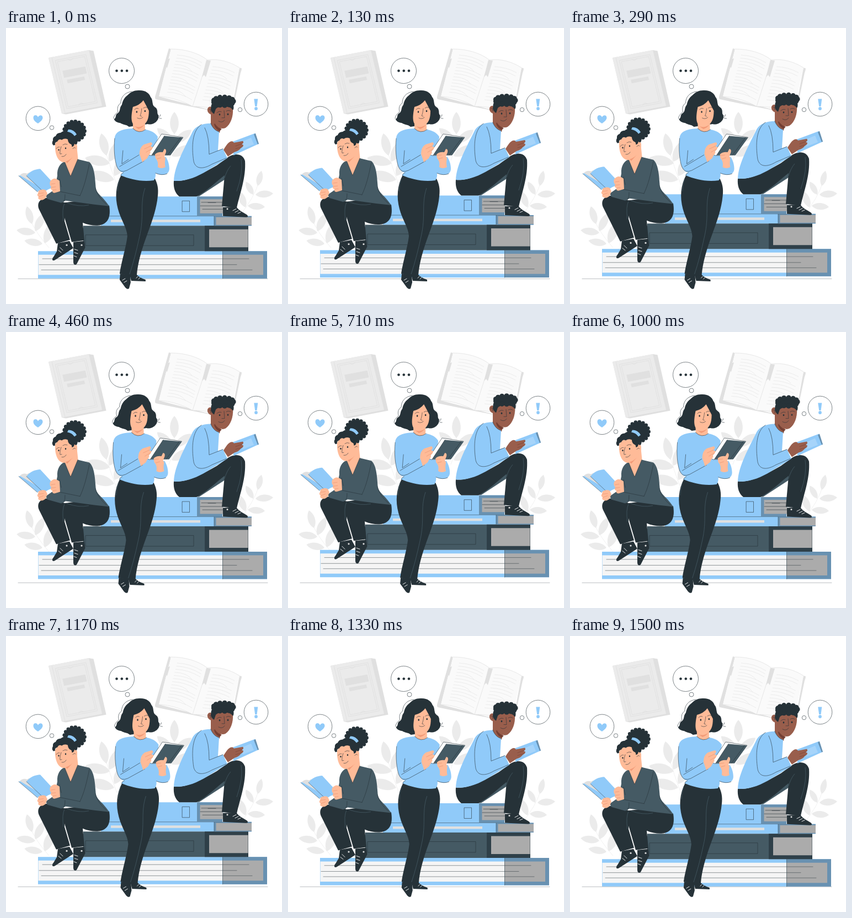
Recreate the animation shown at these times as an HTML page. Size 500x500 px, loop 1540 ms.

```html
<!DOCTYPE html>
<html lang="en">
<head>
<meta charset="utf-8">
<title>Reading together</title>
<style>
html, body { margin: 0; height: 100%; overflow: hidden; background: #fff; }
svg { display: block; width: 100vw; height: 100vh; }
.blue { fill: #90caf9; }
.shade { fill: #6891b1; }
.ink { fill: #263238; }
.slate { fill: #455a64; }
.skin { fill: #ffbb98; }
.brown { fill: #995e4c; }
.page { fill: #ababab; }
.pale { fill: #ebebeb; }
.grey { fill: #e0e0e0; }
.line { fill: none; stroke: #263238; stroke-width: .6; stroke-linecap: round; stroke-linejoin: round; }
.soft { fill: none; stroke: #dedede; stroke-width: .7; }
.seam { fill: none; stroke: #56707c; stroke-width: .5; }
.lace { fill: none; stroke: #fff; stroke-width: .9; stroke-linecap: round; }
.bubble { fill: #fff; stroke: #263238; stroke-width: .6; }
</style>
</head>
<body>
<svg viewBox="0 0 500 500">
  <!-- closed book in the background -->
  <g transform="matrix(.986 -.189 .231 .971 77 54)">
    <path class="grey" d="M0 0L74 0L82 3L81 107L7 107L0 104Z"/>
    <path class="pale" d="M0 0H74V104H0Z"/>
    <path class="soft" d="M6 0V104M7 105H80M77 2V106M11 7H67V97H11ZM14 10H64V94H14Z"/>
    <path class="soft" d="M33 9q5 6 10 0M33 95q5-6 10 0"/>
    <path class="grey" d="M19 28h42v13H19ZM23 45.500h32v6.500H23Z"/>
  </g>

  <!-- open book in the background -->
  <path class="grey" d="M295 37L299 38L277 124L338 140L407 158L423 72L427 73Q427 76 425 81L409 157L338 143L271 129Q269 126 271 121Z"/>
  <path d="M299 38C322 38 347 44 365 58C385 55 406 61 423 72L404 155C382 146 360 142 338 142C318 131 295 125 277 124Z" fill="#fafafa"/>
  <path class="soft" d="M365 58L338 142M277 124C295 125 318 131 338 142C360 142 382 146 404 155M299 38C322 38 347 44 365 58C385 55 406 61 423 72"/>
  <path class="grey" d="M291 57L297 55L292 72L288 70L285 76ZM363 58L371 59L362 89L359 85L355 89Z"/>
  <g id="lines" class="soft" style="stroke:#e6e6e6"></g>

  <g id="leaves" class="pale"></g>
  <path class="soft" d="M43 346Q56 374 78 398M180 222Q188 250 201 284M305 184Q306 214 295 240M458 280Q448 310 423 340" style="stroke:#ebebeb"/>

  <!-- thoughts -->
  <g class="bubble">
    <circle cx="209.500" cy="77.500" r="23"/><circle cx="220" cy="106" r="4"/>
    <circle cx="58" cy="163.800" r="21.800"/><circle cx="83" cy="180.500" r="3.700"/>
    <circle cx="453" cy="138" r="21.800"/><circle cx="424" cy="148" r="3.700"/>
  </g>
  <g class="ink"><circle cx="200.500" cy="77.500" r="2.300"/><circle cx="209.800" cy="77.500" r="2.300"/><circle cx="219" cy="77.500" r="2.300"/></g>
  <path class="blue" d="M58 173C53 170 49.500 167 49.500 162.500C49.500 157 56 156.500 58 161.500C60.500 156.500 67 157.500 66.500 163C66 167 62 170 58 173Z"/>
  <path class="blue" d="M449.300 128.500H456.300L454.500 142H451.200Z"/><circle class="blue" cx="453" cy="146" r="2.900"/>

  <path class="line" d="M22 454.300H474" style="stroke:#8b9296"/>

  <g id="float">
    <!-- stack of books -->
    <path class="blue" d="M58 404.500H473V454H58ZM172 305.500H392V341H172ZM172 341H445V358.500H172Z"/>
    <path d="M58.500 411H393V447.500H58.500Z" fill="#f5f5f5"/>
    <path class="shade" d="M392.500 404.500H473V454H392.500Z"/>
    <path class="page" d="M392.500 411H466V447.500H392.500Z"/>
    <path class="line" d="M66 418.300H440M60 429H418M64 438.500H446M392.500 404.500V454" style="stroke-width:.5"/>
    <path class="slate" d="M140 358.500H439V404.500H140Z"/>
    <path d="M360 358.500H439V404.500H360Z" fill="#2f4049"/>
    <path class="page" d="M368 365H438.500V397.500H368Z"/>
    <path class="line" d="M144.500 375H340V394.500H144.500Z"/>
    <path class="grey" d="M190 347.500H352V352H190Z"/>
    <path class="shade" d="M377 341H445V358.500H377Z"/>
    <path class="page" d="M380.500 343H445V357H380.500Z"/>
    <path class="line" d="M172 341H392M377 341V358" style="stroke-width:.5"/>
    <path class="line" d="M319.500 313.500H332.500V333H319.500Z"/>
    <path class="shade" d="M346 305.500H395L392 341H346Z"/>
    <path class="page" d="M351.500 310.500H393V336H351.500Z"/>
    <path class="line" d="M354 316H393M366 316.500H380M352 322.500H393M356 328.500H393"/>

    <!-- seated girl -->
    <path class="ink" d="M108 317L76 308C62 308 55 317 60 329L91 391L116 384L106 350Z"/>
    <path class="ink" d="M103 317C102 325 103 330 104 337L119 388L142 385L139 353C150 358 165 359 172 357C186 353 190 341 187 322L150 311Z"/>
    <path class="seam" d="M104 350Q101 328 106 318M110 317Q132 325 150 321"/>
    <path class="ink" d="M94 390L115 386L122 399L88 421C83 423 83 418 86 415L92 405Z"/>
    <path class="ink" d="M122 388L142 386L143.500 398L129 426C127 431 122 430 122 424Z"/>
    <path class="lace" d="M98 398L103 403M95 403L100 407M124 401L130 403M124 407L130 409M123 413L128 415"/>
    <circle cx="110" cy="393.500" r="1.600" class="grey"/><circle cx="137" cy="393.500" r="1.600" class="grey"/>
    <path class="skin" d="M107 235L106 246L117 271L131 242L128 213Z"/>
    <path class="slate" d="M106 242C98 246 92 254 93 268L88 293L72 304L75 310L100 317L108 313L160 320L187 323C176 306 166 302 163 292C161 272 161 252 151 243L130 238L117 269Z"/>
    <path class="line" d="M151 246C146 270 142 287 134 304M95 296L134 304M162 290Q165 305 182 320M104 316Q108 309 107 302M97 274L100 288M106 242L117 269L130 238"/>
    <g id="bun" class="ink"></g>
    <path class="skin" d="M89 211C88 226 93 243 105 243.500C112 243 119 238 122 232Q130 226 129 214C124 196 94 194 89 211Z"/>
    <path class="ink" d="M86 213Q82 209 85 204Q84 198 90 196Q92 190 99 190Q105 185 112 187L124 190Q132 202 129 209Q128 213 124 210Q123 216 119 215Q120 211 116 210Q112 207 112 202Q106 199 101 203Q96 200 93 206Q88 207 89 212Z"/>
    <path class="blue" d="M113 184Q123 184 128 193L124 196Q119 189 111 188Z"/>
    <path class="line" d="M100 215Q97 225 98 228.500L101 228M101 233Q106 234 109 229M91 219Q93 215 97 216M103 212Q107 209 111 211M121 219Q124 215 126 218"/>
    <ellipse class="ink" cx="95.500" cy="221" rx="1.200" ry="1.600"/><ellipse class="ink" cx="108" cy="218" rx="1.200" ry="1.600"/>
    <path d="M108 242Q115 240 121 234L111 245Z" fill="#f29b78"/>
    <path class="blue" d="M23 268L32 266L66 293L57 297Z"/>
    <path class="grey" d="M25 267Q31 261 38 264L42 262L66 291Z"/>
    <path class="blue" d="M37 268C44 259 53 256 62 255.500L92 288C84 289 75 292 69 298Z"/>
    <path class="line" d="M23 268L57 297M37 268L69 298" style="stroke-width:.5"/>
    <path class="skin" d="M59 295Q67 291 72 294L75 300L72 308Q66 314 61 311Q57 310 59 306Q55 303 58 300Z"/>
    <path class="skin" d="M80 278Q86 271 92 274L97 277L98 296L88 299Q83 299 84 294Q79 292 82 288Q78 284 80 278Z"/>
    <path class="line" d="M59 300L68 299M60 306L68 303M82 283L89 282M82 289L90 288M85 294L91 293" style="stroke:#e58f6d"/>

    <!-- seated man -->
    <path class="slate" d="M330 305L396 258V275L350 305Z"/>
    <path class="ink" d="M304 277C325 279 345 270 382 249L400 236C412 226 429 227 433 241C435 271 424 299 418 326L391 323L396 267C380 279 364 296 345 305.500H314C306 299 303 290 304 277Z"/>
    <path class="seam" d="M396 272Q400 258 407 250M426 238Q430 262 418 296"/>
    <path class="ink" d="M393 325L417 324C423 332 431 335 437 339Q440 343 435 343L393 341Z"/>
    <path class="lace" d="M411 331L417 328M415 334L421 331M420 336L425 334"/><circle cx="401" cy="328" r="1.500" class="grey"/>
    <path class="brown" d="M371 150L371 177Q379 190 387 190L392 170L385 148Z"/>
    <path class="blue" d="M371 173C355 173 343 179 338 188C325 215 305 249 304 277C325 279 346 270 364 259L401 236L393 219L384 222L386 188C380 187 374 181 371 173Z"/>
    <path class="line" d="M354 175C337 186 336 215 340 242C344 258 360 255 373 247L399 236M360 181Q368 196 368 229L393 219M371 173C374 181 380 187 386 188"/>
    <path class="brown" d="M374 147C382 135 405 134 411 147C412 160 407 175 398 181C390 185 382 179 378 172L375 157C369 158 364 153 365 147C367 141 373 142 374 147Z"/>
    <path d="M378 173Q384 182 391 183L387 187Q379 183 377 175Z" fill="#743f33"/>
    <path class="ink" d="M371 148Q371 133 381 128L411 135Q414 147 411 149Q406 142 397 143Q384 142 380 147L377 156Q373 154 371 148Z"/>
    <g id="curls" class="ink"></g>
    <path class="line" d="M395 150L396 163L391 163M385 169Q392 173 396 167M382 154Q386 150 390 152M399 151Q403 148 407 151M368 147Q372 148 371 153"/>
    <ellipse class="ink" cx="387" cy="157" rx="1.300" ry="1.700"/><ellipse class="ink" cx="402" cy="156.500" rx="1.300" ry="1.700"/>
    <path class="blue" d="M411 206L451 191L458 210L412 231Z"/>
    <path class="shade" d="M449 193L452 191L458 210L456 211Z"/>
    <path d="M428 206L444 199L449 211L428 219Z" fill="#a6d4fa"/>
    <path class="brown" d="M394 221C401 209 406 204 411 206L413 208L429 205Q432 208 427 211L430 212Q430 216 426 217Q422 223 414 225L402 233Z"/>
    <path class="line" d="M427 210L416 214M427 216L416 219" style="stroke:#743f33"/>
  </g>

  <g id="shake">
    <!-- standing woman -->
    <path class="ink" d="M207 445L225 448L226 461L223 472Q219 475 214 467L206 456Z"/>
    <path class="ink" d="M224 446L237 447Q243 453 253 456V459L227 458Z"/>
    <path class="lace" d="M211 457L216 454M214 461L219 458M236 453L239 450M240 455L243 452"/>
    <path class="ink" d="M209 266C199 285 197 306 203 328C208 347 219 361 220 377C218 396 209 424 206 445L224 449L237 448C239 424 246 401 257 371C266 347 273 326 275 305C277 290 274 281 270 273Z"/>
    <path class="seam" d="M252 290C242 320 251 340 242 378Q234 416 224 446M206 273Q202 286 202 296"/>
    <path class="ink" d="M240 113C252 112 260 118 262 125C267 130 264 139 269 143C277 147 272 153 276 158C279 168 266 177 257 174L223 179C217 174 213 176 207 172C202 172 196 168 196 165C201 162 197 157 203 154C208 150 205 145 210 139C212 130 215 126 220 122C226 116 232 113 240 113Z"/>
    <path class="line" d="M228 115C214 117 208 126 208 136Q200 141 203 152Q195 158 195 164M263 139Q276 144 274 156Q280 164 280 157M274 156Q276 165 282 164"/>
    <path class="skin" d="M230 169V184Q241 193 252 184V168Z"/>
    <path class="skin" d="M230 143C227 158 225 173 235 178Q240 180 247 177C256 172 259 164 259 150Q254 140 249 131Q242 140 230 143Z"/>
    <path d="M233 178Q242 182 251 175Q247 181 240 183Z" fill="#f29b78"/>
    <path class="line" d="M246 146Q245 156 243 159L246 160M238 163Q243 166 248 162M233 148Q236 144 240 146M249 145Q253 142 256 144"/>
    <ellipse class="ink" cx="237" cy="152" rx="1.300" ry="1.700"/><ellipse class="ink" cx="252" cy="150.500" rx="1.300" ry="1.700"/>
    <path class="blue" d="M230 182C212 183 198 186 197 200C195 220 197 240 201 251Q205 261 213 262Q208 264 208 267C225 274 245 279 268 276Q272 270 271 263C283 269 296 266 296 255C296 246 293 239 290 234L272 230L275 197C270 189 263 186 253 184Q241 193 230 182Z"/>
    <path class="line" d="M197 200C195 220 197 240 201 251Q206 264 219 258L250 241M206 251L241 230M212 222L210 246L222 238M271 263Q283 268 292 264M213 262Q208 264 208 267M230 182Q241 193 253 184"/>
    <path d="M257 229L282 192L321 198L298 230L262 231Z" fill="#fff" stroke="#263238" stroke-width=".6"/>
    <path class="slate" d="M287 195.500L321 198.500L298 230.500L264 230.500Z"/>
    <path class="line" d="M287 195.500L264 230.500M316 199L293 230"/>
    <path class="skin" d="M242 228Q242 216 250 211L263 207Q267 210 262 214L266 216Q265 221 261 223L262 226Q257 233 256 236L247 243Z"/>
    <path class="skin" d="M270 229Q275 224 284 225L287 219Q291 219 290 225L287 233L289 236Q287 246 289 252Q281 256 275 252Q277 242 271 236Z"/>
    <path class="line" d="M251 219L262 214M254 225L264 219M271 231L279 230M274 237L281 235" style="stroke:#e58f6d"/>
  </g>
</svg>

<script>
const $ = id => document.getElementById(id);

// base x, base y, direction in degrees, length
const leaves = [
  [47, 355, -106, 33], [53, 371, 188, 34], [66, 391, 190, 33], [53, 368, -64, 36], [70, 390, -68, 42],
  [182, 231, -103, 41], [188, 245, 192, 46], [196, 275, 195, 48], [187, 242, -62, 45], [196, 268, -60, 46],
  [305, 192, -90, 40], [306, 208, -38, 38], [302, 207, -138, 38], [300, 232, -28, 40],
  [456, 286, -76, 28], [448, 302, -120, 27], [452, 302, -4, 32], [438, 322, 4, 31], [434, 325, -112, 32]
];
$('leaves').innerHTML = leaves.map(([x, y, angle, size]) =>
  `<path transform="translate(${x} ${y}) rotate(${angle}) scale(${size})"
    d="M0 0C.25-.26 .72-.26 1 0C.72 .26 .25 .26 0 0Z"/>`).join('');

// a filled ellipse with round curls along its rim
function curly(id, cx, cy, rx, ry, count, r) {
  let out = `<ellipse cx="${cx}" cy="${cy}" rx="${rx}" ry="${ry}"/>`;
  for (let i = 0; i < count; i++) {
    const a = i / count * 2 * Math.PI;
    out += `<circle cx="${cx + rx * Math.cos(a)}" cy="${cy + ry * Math.sin(a)}" r="${r}"/>`;
  }
  $(id).innerHTML = out;
}
curly('bun', 124, 187, 18.5, 17.5, 17, 3.4);
curly('curls', 394, 133, 18, 7.5, 13, 4.6);

let text = '';
for (let i = 0; i < 13; i++) {
  text += `M${310 - i * 1.5} ${49 + i * 5.6}q24 1 ${i % 4 == 3 ? 32 : 45} 14`;
  if (i < 11) text += `M${374 - i * 1.8} ${70 + i * 6}q22 1 ${i % 4 == 2 ? 30 : 40} 11`;
}
$('lines').innerHTML = `<path d="${text}"/>`;

const LOOP = 1540, CYCLE = 1500, FPS = 24, LEAD = 20;
const shakeX = [0, -1, 2, -4, 4, -4, 4, -4, 2, -1, 0];

function draw(now) {
  const step = Math.min(36, Math.floor((now % LOOP + 2) * FPS / 1000));
  const p = (step * 1000 / FPS + LEAD) % CYCLE / CYCLE;
  const k = Math.floor(p * 10);
  const x = shakeX[k] + (shakeX[k + 1] - shakeX[k]) * (p * 10 - k);
  const y = -10 * (1 - Math.abs(2 * p - 1));
  $('float').setAttribute('transform', `translate(0 ${y})`);
  $('shake').setAttribute('transform', `translate(${x} 0)`);
}

const start = performance.now();
function tick() {
  draw(performance.now() - start);
  requestAnimationFrame(tick);
}
tick();
</script>
</body>
</html>
```
